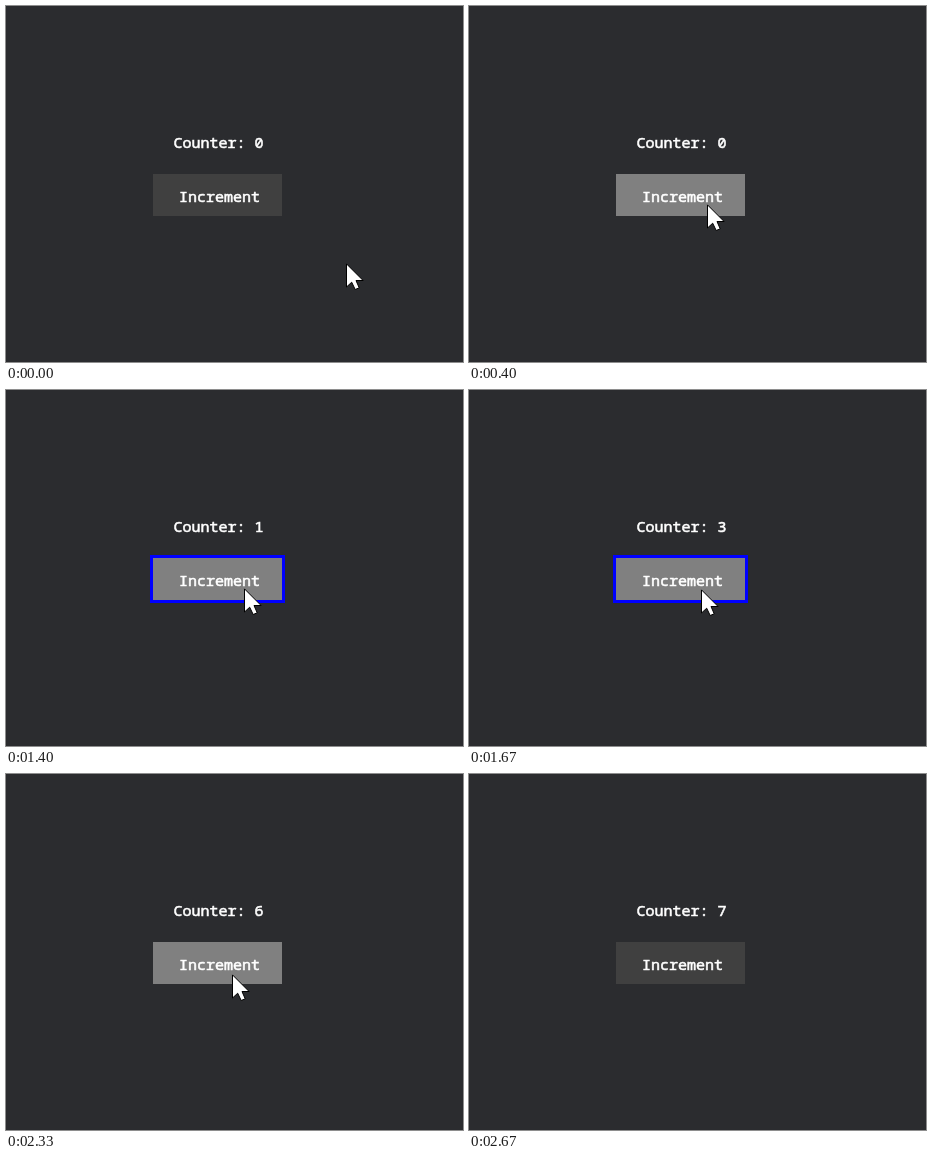
Write an HTML page that moves like this. It is 457 px wide and 356 px high and loops after 3.07 s.

```html
<!DOCTYPE html>
<html lang="en">
<head>
<meta charset="utf-8">
<title>Counter</title>
<style>
  html, body { margin: 0; width: 100%; height: 100%; overflow: hidden; background: #2b2c2f; }
  svg { display: block; width: 100%; height: 100%; }
  text {
    font: 500 15px "Noto Sans Mono", monospace;
    fill: #fff; stroke: #fff; stroke-width: .6; white-space: pre;
  }
</style>
</head>
<body>
<svg viewBox="0 0 457 356">
  <rect width="457" height="356" fill="#2b2c2f"/>
  <text id="label" x="167.5" y="142"></text>
  <rect id="ring" x="144" y="165" width="135" height="48" fill="#00f"/>
  <rect id="button" x="147" y="168" width="129" height="42"/>
  <text x="173" y="196">Increment</text>
  <path id="cursor" d="M.5 .9V24L5.7 19.2L9.2 26.5L13.2 24.8L10 17.5H17.1Z" fill="#fff" stroke="#000"/>
</svg>
<script>
  const LOOP = 3070, FPS = 15;
  const $ = id => document.getElementById(id);
  const label = $('label'), ring = $('ring'), button = $('button'), cursor = $('cursor');

  const linear = u => u;
  const smooth = u => u * u * (3 - 2 * u);
  const accelerate = u => u * u;

  // All times below are in ticks of 1 / FPS seconds.
  const start = { x: 340, y: 257 };
  const moves = [
    { from: 0, to: 6, x: 238, y: 198, ease: smooth },
    { from: 22, to: 28, x: 226, y: 200, ease: linear },
    { from: 36, to: 40, x: 221, y: 380, ease: accelerate }
  ];
  const presses = [10, 21, 23, 25, 28, 31, 34];
  const HOLD = 1, LAG = 2;

  function pointer(tick) {
    let { x, y } = start;
    for (const m of moves) {
      const u = m.ease(Math.min(1, Math.max(0, (tick - m.from) / (m.to - m.from))));
      x += (m.x - x) * u;
      y += (m.y - y) * u;
    }
    return [Math.round(x), Math.round(y)];
  }

  function draw(t) {
    const tick = Math.floor((t + 4) * FPS / 1000);
    const [x, y] = pointer(tick);
    const hover = x >= 147 && x < 276 && y >= 168 && y < 210;
    const pressed = presses.some(p => tick >= p && tick < p + HOLD);
    const count = presses.filter(p => tick >= p + LAG).length;

    label.textContent = `Counter: ${count}`;
    button.setAttribute('fill', hover ? '#808080' : '#404040');
    ring.setAttribute('visibility', pressed ? 'visible' : 'hidden');
    cursor.setAttribute('transform', `translate(${x} ${y})`);
  }

  const began = performance.now();
  function frame() {
    draw((performance.now() - began) % LOOP);
    requestAnimationFrame(frame);
  }
  frame();
</script>
</body>
</html>
```
